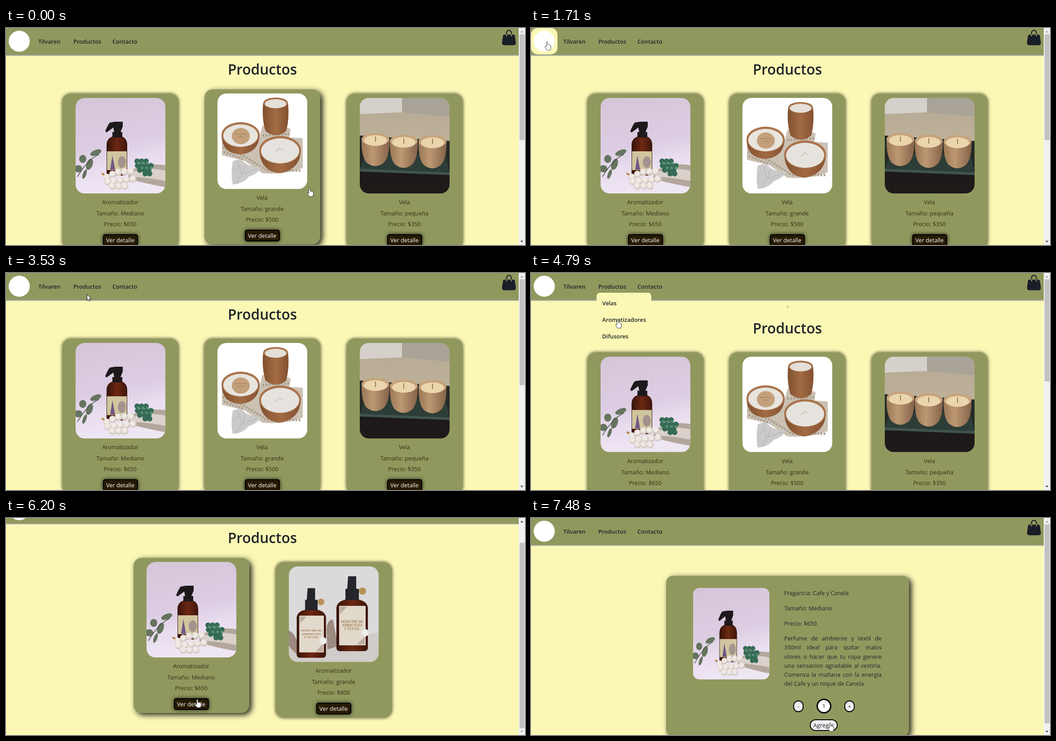
Recreate the animation shown at these times as an HTML page. Size 1156x484 px, loop 8000 ms.

```html
<!DOCTYPE html>
<html lang="es">
<head>
<meta charset="utf-8">
<title>Productos</title>
<style>
:root {
  --olive: #90985e;
  --cream: #fbf8b6;
  --ink: #20252a;
  --rest: 0 0 7px 1px rgba(20, 18, 0, .7);
  --high: 5px 4px 13px rgba(0, 0, 0, .9);
}
html, body { margin: 0; width: 100%; height: 100%; overflow: hidden; }
body { background: var(--cream); color: var(--ink); font: 12.75px/20px "Open Sans", "Noto Sans", sans-serif; }
* { box-sizing: border-box; animation-duration: 8s; animation-iteration-count: infinite; }
#stage { position: relative; width: 1156px; height: 484px; overflow: hidden; background: var(--cream); }
#stage div, #stage svg, #stage span, h1 { position: absolute; }
span { white-space: nowrap; }
.step { animation-timing-function: step-end; }

#page { left: 0; top: 0; width: 1142px; height: 540px; animation-name: scroll; animation-timing-function: ease-in-out; }
#header { left: 0; top: 0; width: 100%; height: 61px; background: var(--olive); border-bottom: 1px solid #a5a3a8; box-shadow: 0 1px 1px rgba(150, 148, 160, .7); }
.view { left: 0; top: 0; width: 100%; height: 100%; }
#home { animation-name: home; }
#some { animation-name: some; }
#detail { animation-name: detail; }
#shift { left: 0; top: 0; width: 100%; animation-name: shift; }
#spinner { left: 557.5px; top: 61.5px; width: 27px; height: 27px; border-radius: 50%; background: var(--ink); animation-name: grow; animation-timing-function: linear; }
h1 { left: 0; top: 72px; width: 100%; margin: 0; text-align: center; font-size: 31.6px; line-height: 40px; font-weight: 600; }

#brand { left: 0; top: 0; width: 59px; height: 59px; border-radius: 15px; animation-name: brand; }
#brand::after { content: ""; position: absolute; left: 6px; top: 6px; width: 47px; height: 47px; border-radius: 50%; background: #fff; }
.link { top: 15px; padding: 5px 4px 4px; height: 29px; border-radius: 8px; font-weight: 600; }
#first { left: 68px; width: 61px; animation-name: first; }
#second { left: 146px; width: 71px; animation-name: second; }
#menu { left: 146px; top: 44px; width: 122px; height: 120px; border-radius: 8px; background: var(--cream); font-weight: 600; animation-name: menu; }
#menu span { left: 12.5px; }
#bag { left: 1103px; top: 4px; }

.card { top: 147px; width: 258px; height: 346px; border-radius: 18px; background: var(--olive); box-shadow: var(--rest); color: #382d14; }
.card span { left: 0; width: 100%; text-align: center; }
.card .photo { left: 29.5px; top: 9px; width: 200px; height: 213px; border-radius: 20px; }
.card .button { left: 90px; top: 313px; width: 78px; height: 26px; border: 2px solid #000; border-radius: 5px; background: #261a03; color: #fff; line-height: 22px; box-shadow: 0 0 8px rgba(0, 0, 0, .8); }
.pass { animation-name: pass; }
.drop { animation-name: drop; }
.rise { animation-name: rise; }

#box { left: 301px; top: 129px; width: 541px; height: 358px; border-radius: 15px; background: var(--olive); box-shadow: var(--high); }
#box .photo { left: 60px; top: 27px; width: 170px; height: 204px; border-radius: 14px; }
#box > span { left: 263px; }
#text { left: 263px; top: 129px; width: 217px; line-height: 20.3px; }
#text p { margin: 0; white-space: nowrap; text-align-last: justify; }
#text p:last-child { text-align-last: left; }
.pill { border: 2px solid #000; border-radius: 13px; background: #f0eef0; text-align: center; line-height: 22px; height: 26px; }

#bar { left: 1142px; top: 0; width: 14px; height: 484px; background: #f1f1f1; }
#thumb { left: 2px; width: 11px; background: #c1c1c1; animation-name: thumb; animation-timing-function: ease-in-out; }
#up { animation-name: up; }
#down { animation-name: down; }

#cursor { left: -6px; top: -1px; width: 24px; height: 24px; overflow: hidden; animation-name: move; animation-timing-function: linear; }
#cursor svg { left: 0; top: 0; animation-name: shape; }

/* 1% = 80 ms */
@keyframes home { 0% { visibility: visible } 63.875%, 100% { visibility: hidden } }
@keyframes some { 0% { visibility: hidden } 63.875% { visibility: visible } 84.625%, 100% { visibility: hidden } }
@keyframes detail { 0% { visibility: hidden } 84.625%, 100% { visibility: visible } }
@keyframes menu {
  0%, 100% { visibility: hidden }
  35% { visibility: visible } 42% { visibility: hidden }
  48.5% { visibility: visible } 65.3% { visibility: hidden }
}
@keyframes shift { 0% { transform: none } 58.125%, 100% { transform: translateY(30.5px) } }
@keyframes grow {
  0%, 59% { transform: scale(0); opacity: 0 }
  61%, 100% { transform: scale(.45); opacity: .45 }
}
@keyframes scroll {
  0%, 66.2% { transform: none }
  68.5%, 84.62% { transform: translateY(-48px) }
  84.63%, 100% { transform: none }
}
@keyframes thumb {
  0%, 58.12% { top: 14px; height: 236px }
  58.13%, 63.87% { top: 14px; height: 228px }
  63.88%, 66.2% { top: 14px; height: 414px }
  68.5%, 84.62% { top: 55px; height: 414px }
  84.63%, 100% { top: 14px; height: 444px }
}
@keyframes up { 0%, 100% { fill: #a3a3a3 } 66.5% { fill: #505050 } 84.625% { fill: #a3a3a3 } }
@keyframes down { 0%, 100% { fill: #505050 } 68.4% { fill: #a3a3a3 } 84.625% { fill: #505050 } }
@keyframes brand {
  0%, 15% { background: rgba(251, 248, 182, 0) }
  21.25%, 24.2% { background: rgba(251, 248, 182, 1) }
  30.4%, 100% { background: rgba(251, 248, 182, 0) }
}
@keyframes first {
  0%, 24.9% { background: rgba(251, 248, 182, 0) }
  31.1%, 33.5% { background: rgba(251, 248, 182, 1) }
  39.5%, 100% { background: rgba(251, 248, 182, 0) }
}
@keyframes second {
  0%, 34.5% { background: rgba(251, 248, 182, 0) }
  37% { background: rgba(251, 248, 182, .5) }
  42.5%, 48% { background: rgba(251, 248, 182, 0) }
  51% { background: rgba(251, 248, 182, .5) }
  57%, 100% { background: rgba(251, 248, 182, 0) }
}
@keyframes pass { 0%, 5.8%, 10.5%, 100% { transform: none } 7.4% { transform: translateY(-3px) } }
@keyframes drop {
  0%, 4.5% { transform: translateY(-10px); box-shadow: var(--high) }
  10.5%, 100% { transform: none; box-shadow: var(--rest) }
}
@keyframes rise {
  0%, 71.2% { transform: none; box-shadow: var(--rest) }
  77.3%, 100% { transform: translateY(-10px); box-shadow: var(--high) }
}
@keyframes move {
  0%, 1% { transform: translate(676px, 357px); animation-timing-function: ease-in-out }
  11.2%, 11.5% { transform: translate(66px, 65px) }
  12.5% { transform: translate(63px, 70px) }
  17% { transform: translate(34px, 32px) }
  22% { transform: translate(36px, 30px) }
  25.5%, 33% { transform: translate(87px, 28px) }
  36% { transform: translate(178px, 32px) }
  39% { transform: translate(185px, 68px) }
  43% { transform: translate(182px, 59px) }
  44.1%, 47.2% { transform: translate(180px, 47px) }
  50% { transform: translate(179px, 32px) }
  57%, 64.5% { transform: translate(193px, 104px) }
  67% { transform: translate(205px, 150px) }
  72% { transform: translate(296px, 300px) }
  74.5% { transform: translate(350px, 352px) }
  77.5% { transform: translate(426px, 404px) }
  80% { transform: translate(429px, 409px) }
  82.5%, 87.4% { transform: translate(427px, 411px); animation-timing-function: ease-in-out }
  93.5%, 100% { transform: translate(666px, 457px) }
}
@keyframes shape {
  0%, 5.6%, 14.5%, 24.7%, 34.5%, 48.2%, 71.2%, 91.5%, 100% { transform: translateX(-24px) }
  4.5%, 7%, 24%, 33.8%, 42%, 65.2%, 84.625% { transform: none }
}
</style>
</head>
<body>
<svg width="0" height="0" style="position:absolute">
  <defs>
    <linearGradient id="lilac" x2=".2" y2="1"><stop stop-color="#d5c5d8"/><stop offset=".55" stop-color="#dccde3"/><stop offset=".75" stop-color="#e8dcee"/><stop offset="1" stop-color="#efe6f4"/></linearGradient>
    <linearGradient id="amber"><stop stop-color="#35130b"/><stop offset=".5" stop-color="#6d2812"/><stop offset="1" stop-color="#3c150b"/></linearGradient>
    <linearGradient id="wood"><stop stop-color="#9a7857"/><stop offset=".4" stop-color="#bd9872"/><stop offset="1" stop-color="#84634a"/></linearGradient>
    <linearGradient id="oak"><stop stop-color="#80502f"/><stop offset=".5" stop-color="#a26b43"/><stop offset="1" stop-color="#835031"/></linearGradient>
    <linearGradient id="wall" x2="0" y2="1"><stop stop-color="#b5a994"/><stop offset="1" stop-color="#c9baa0"/></linearGradient>
  </defs>
  <symbol id="spray" viewBox="0 0 200 213" preserveAspectRatio="none">
    <rect width="200" height="213" fill="url(#lilac)"/>
    <path d="M118 166Q150 143 200 150V199Q150 190 118 180Z" fill="#b3a79d"/>
    <path d="M122 168Q155 152 200 162V185Q150 176 122 176Z" fill="#d9d1ca"/>
    <g fill="#66745f"><ellipse cx="45" cy="122" rx="13" ry="6" transform="rotate(-22 45 122)"/><ellipse cx="16" cy="136" rx="8" ry="9"/><ellipse cx="31" cy="148" rx="7" ry="13" transform="rotate(20 31 148)"/><ellipse cx="6" cy="158" rx="9" ry="8"/><ellipse cx="20" cy="170" rx="4" ry="11" transform="rotate(20 20 170)"/></g>
    <path d="M52 126Q28 136 4 176" fill="none" stroke="#4d5848" stroke-width="1.5"/>
    <path d="M69 105Q69 91 82 86H104Q115 91 115 105V167Q115 173 108 173H76Q69 173 69 167Z" fill="url(#amber)"/>
    <path d="M70 119H114V161H70Z" fill="#cfc59e"/>
    <path d="M77 160L82 128L88 160Z" fill="#6e5783"/><ellipse cx="103" cy="143" rx="9" ry="13" fill="#a2938e"/>
    <path d="M82 76H104V88H82ZM86 76L84 66L69 77L66 74Q72 60 76 55L88 53H105V64L100 76Z" fill="#1d191b"/>
    <path d="M137 141h24M138 151h35M143 161h30M155 169h18" stroke="#356b55" stroke-width="12" stroke-linecap="round" stroke-dasharray="0 10" fill="none"/>
    <path d="M140 145h24M148 156h22" stroke="#5c8e76" stroke-width="6" stroke-linecap="round" stroke-dasharray="0 10" fill="none"/>
    <path d="M58 168L74 178" stroke="#b48b4c" stroke-width="4"/>
    <path d="M70 177L91 166L132 164M72 187L130 181M82 197H118" stroke="#d6cdc8" stroke-width="16" stroke-linecap="round" stroke-dasharray="0 14" fill="none"/>
    <path d="M69 175L90 164L131 162M71 185L129 179M81 195H117" stroke="#eee9e2" stroke-width="12" stroke-linecap="round" stroke-dasharray="0 14" fill="none"/>
  </symbol>
  <symbol id="bowls" viewBox="0 0 200 213" preserveAspectRatio="none">
    <rect width="200" height="213" fill="#fff"/>
    <path d="M10 105L95 92L100 72Q130 60 163 80L160 98L190 100V166Q150 182 100 178L60 150L10 138Z" fill="#cbc1b3"/>
    <path d="M12 120L60 140L110 172H186M100 94L160 90M14 130L60 148" fill="none" stroke="#aa9f90" stroke-width="5" stroke-dasharray="4 3"/>
    <path d="M102 20Q98 55 107 84Q130 102 153 84Q161 55 157 20Z" fill="url(#oak)"/>
    <ellipse cx="129.500" cy="21" rx="27.500" ry="12" fill="#a9754d"/><ellipse cx="129.500" cy="23" rx="24" ry="10" fill="#e4dfd7"/>
    <path d="M9 92Q10 135 52 136Q92 132 94 92Z" fill="url(#oak)"/>
    <ellipse cx="51.500" cy="92" rx="42.500" ry="28" fill="#a9744c"/><ellipse cx="51.500" cy="94" rx="38.500" ry="25" fill="#e8e4de"/>
    <ellipse cx="52" cy="95" rx="20" ry="18" fill="#c3a07b"/><path d="M38 91H66M45 97H59" stroke="#9d7850"/>
    <path d="M93 126Q96 174 139 178Q184 170 186 126Z" fill="url(#oak)"/>
    <ellipse cx="139.500" cy="126" rx="46.500" ry="31" fill="#a9734a"/><ellipse cx="139.500" cy="128" rx="42.500" ry="28" fill="#e6e3de"/>
    <path d="M130 130L138 122L146 127" fill="none" stroke="#cbc3b8" stroke-width="2"/>
    <path d="M34 151Q52 142 62 156Q80 166 98 164Q88 181 70 185Q58 201 34 203Q29 180 34 151Z" fill="#cbc9c9"/>
    <path d="M46 152L54 180L42 200M54 180L90 168M48 165L36 172M62 160L57 178" fill="none" stroke="#aeabab"/>
  </symbol>
  <symbol id="cups" viewBox="0 0 200 213" preserveAspectRatio="none">
    <rect width="200" height="213" fill="url(#wall)"/>
    <path d="M0 0H94V32L0 36Z" fill="#d5d0ca"/><path d="M94 0H200V42L94 32Z" fill="#aaa397"/>
    <path d="M0 84L200 96V213H0Z" fill="#1d1a19"/>
    <path d="M0 84L200 96V158L0 164Z" fill="#262a27"/>
    <path d="M14 124H190L200 166L0 158Z" fill="#2d3d37"/><path d="M0 158L200 166V172L0 164Z" fill="#40554d"/>
    <g id="cup"><path d="M4 92Q3 130 15 144Q35 160 54 144Q67 130 66 92Z" fill="url(#wood)"/><ellipse cx="35" cy="92" rx="31" ry="14" fill="#c6a37c"/><ellipse cx="35" cy="95" rx="26" ry="12" fill="#ead5ad"/><path d="M35 86V98" stroke="#7c5d3c" stroke-width="1.500"/></g>
    <use href="#cup" x="63" y="4"/><use href="#cup" x="127" y="5"/>
  </symbol>
  <symbol id="duo" viewBox="0 0 200 213" preserveAspectRatio="none">
    <rect width="200" height="213" fill="#dbd9da"/>
    <path d="M0 165L200 148V213H0Z" fill="#cfccca"/>
    <path d="M0 143Q20 150 24 200Q8 190 0 176ZM84 142Q84 120 98 118L110 178L86 185Z" fill="#9c8a80"/>
    <g id="flask"><path d="M106 92Q108 78 126 74H156Q174 78 176 92V181Q176 189 168 189H114Q106 189 106 181Z" fill="url(#amber)"/>
    <path d="M126 50H156V75H126ZM132 22H150V50H130Z" fill="#25252c"/><circle cx="164" cy="55" r="8" fill="#b99155"/>
    <path d="M112 88H171V176H112Z" fill="#e2d9cd"/><path d="M114 90H130L114 106ZM169 174V156L152 174Z" fill="#bcae9f"/>
    <g font-family="'Liberation Serif',serif" font-size="7.600" font-weight="700" fill="#a07b50" text-anchor="middle"><text x="141" y="126">PERFUME DE</text><text x="141" y="134">AMBIENTES</text><text x="141" y="142">Y TEXTIL</text></g></g>
    <use href="#flask" transform="translate(-81 28) scale(.93)"/>
    <circle cx="170" cy="148" r="8" fill="#eee"/><circle cx="76" cy="166" r="8" fill="#eee"/>
  </symbol>
</svg>

<div id="stage">
  <div id="page">
    <div id="header">
      <div id="brand"></div>
      <span class="link" id="first">Tilvaren</span>
      <span class="link" id="second">Productos</span>
      <span class="link" style="left:233px">Contacto</span>
      <svg id="bag" width="34.500" height="34.500" viewBox="0 0 16 16" fill="none">
        <path d="M3.400 5H12.600Q13.900 5 14.100 6.300L15.150 13.100Q15.300 16 12.700 16H3.300Q.7 16 .85 13.100L1.900 6.300Q2.100 5 3.400 5Z" fill="#191d27"/>
        <path d="M5.500 5V3A2.500 2.500 0 0 1 10.500 3V5" stroke="#191d27"/>
        <path d="M5.500 5V6.500M10.500 5V6.500" stroke="#90985e" stroke-linecap="round"/>
      </svg>
    </div>
    <div class="view step" id="home">
      <div id="spinner"></div>
      <div class="step" id="shift"><h1>Productos</h1></div>
    </div>
    <div class="view step" id="some"><h1>Productos</h1></div>
    <div class="view step" id="detail">
      <div id="box">
        <svg class="photo"><use href="#spray"/></svg>
        <span style="top:28px">Fragancia: Cafe y Canela</span>
        <span style="top:62px">Tamaño: Mediano</span>
        <span style="top:96px">Precio: $650</span>
        <div id="text">
          <p>Perfume de ambiente y textil de</p>
          <p>350ml ideal para quitar malos</p>
          <p>olores o hacer que tu ropa genere</p>
          <p>una sensacion agradable al vestirla.</p>
          <p>Comenza la mañana con la energia</p>
          <p>del Cafe y un toque de Canela</p>
        </div>
        <div class="pill" style="left:283px;top:278px;width:23px">-</div>
        <div class="pill" style="left:335px;top:274px;width:33px;height:33px;line-height:27px;border-width:3px;border-radius:50%;background:#fff">1</div>
        <div class="pill" style="left:397px;top:278px;width:23px">+</div>
        <div class="pill" style="left:320px;top:320px;width:62px">Agregar</div>
      </div>
    </div>
    <div class="step" id="menu">
      <span style="top:13px">Velas</span>
      <span style="top:50px">Aromatizadores</span>
      <span style="top:87px">Difusores</span>
    </div>
  </div>
  <div id="bar">
    <div id="thumb"></div>
    <svg width="14" height="484">
      <path class="step" id="up" d="M3.500 10L7 6L10.500 10Z"/>
      <path class="step" id="down" d="M3.500 474.500L7 478.500L10.500 474.500Z"/>
    </svg>
  </div>
  <div id="cursor">
    <svg class="step" width="48" height="24" fill="#fff" stroke="#111" stroke-linejoin="round">
      <path d="M6.500 1.500V15L9.500 12.200L11.800 17L14 16L11.900 11.500H15.500Z"/>
      <path d="M28.500 13V2.800Q28.500 1.300 30 1.300T31.500 2.800V8Q33 7 34 8.500Q35.500 7.800 36.500 9.300Q38.500 8.800 38.500 11V15L37 20H29.500L25.500 13.500Q24.800 11.500 26.500 11.500Z" stroke-width=".8"/>
    </svg>
  </div>
</div>
<script>
const card = (x, photo, name, size, price, motion = '') => `
  <div class="card ${motion}" style="left:${x}px">
    <svg class="photo"><use href="#${photo}"/></svg>
    <span style="top:231px">${name}</span>
    <span style="top:255.5px">Tamaño: ${size}</span>
    <span style="top:280px">Precio: $${price}</span>
    <span class="button" style="left:90px;width:78px">Ver detalle</span>
  </div>`;
const add = (id, ...cards) =>
  document.getElementById(id).insertAdjacentHTML('beforeend', cards.join(''));

add('shift',
  card(125.5, 'spray', 'Aromatizador', 'Mediano', 650, 'pass'),
  card(441.5, 'bowls', 'Vela', 'grande', 500, 'drop'),
  card(758.5, 'cups', 'Vela', 'pequeña', 350));
add('some',
  card(283.5, 'spray', 'Aromatizador', 'Mediano', 650, 'rise'),
  card(600.5, 'duo', 'Aromatizador', 'grande', 800));
</script>
</body>
</html>
```
